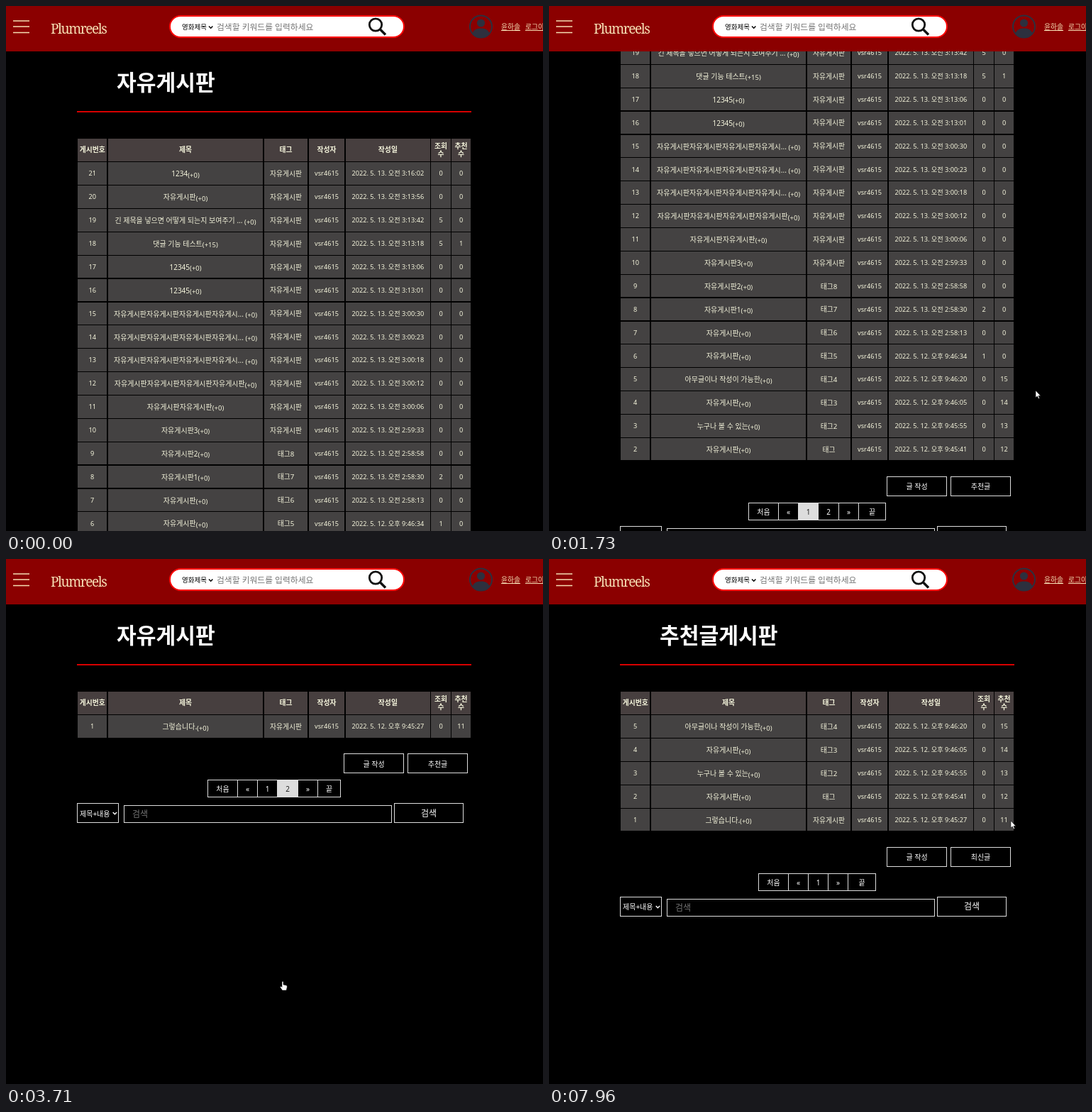
Recreate the animation shown at these times as an HTML page. Size 757 by 740 pixels, loop 8000 ms.

```html
<!DOCTYPE html>
<html lang="ko">
<head>
<meta charset="utf-8">
<title>자유게시판</title>
<style>
html, body { margin: 0; width: 100%; height: 100%; overflow: hidden; background: #000; }
body { position: relative; font: 10px/1.4 "Noto Sans", "Noto Sans CJK KR", "Noto Sans CJK JP", "Noto Sans CJK", sans-serif; color: #fff; }
body * { box-sizing: border-box; }
header, .page, .box, .row, h1, hr, header > *, #cursor, #cursor svg { position: absolute; }

header { left: 0; top: 0; width: 757px; height: 64px; background: #8b0000; color: wheat; overflow: hidden; }
header > span { line-height: 20px; white-space: nowrap; }
.art { left: 0; top: 0; }
.logo { left: 63px; top: 19px; font: 19px "Noto Serif", serif; letter-spacing: -1.4px; }
.kind { left: 248px; top: 19.5px; font-size: 9.5px; color: #000; }
.hint { left: 297px; top: 18.5px; font-size: 11.8px; color: #757575; }
.user { left: 698px; top: 19.5px; font-size: 9.8px; text-decoration: underline; }
.exit { left: 732px; top: 19.5px; font-size: 9.8px; text-decoration: underline; }

.page { left: 0; top: 0; width: 757px; height: 1094px; opacity: 0; }
h1 { margin: 0; left: 156px; top: 87.5px; font-size: 30.2px; line-height: 40px; white-space: nowrap; }
hr { margin: 0; left: 100px; top: 148px; width: 556px; height: 2px; border: 0; background: #d80000; }
.row { left: 101px; height: 31.55px; display: grid; gap: 1.3px; grid-template-columns: 41.4px 218.7px 61.7px 50.7px 119.5px 27.4px 26.8px; color: #f5f5dc; }
.row > div { background: #444242; display: flex; align-items: center; justify-content: center; padding-top: 1.5px; font-size: 9.2px; white-space: pre; text-align: center; }
.row > div:nth-child(2) { font-size: 10px; }
.row > div:nth-child(3) { font-size: 9.8px; }
.row.head { top: 186.6px; height: 32.5px; }
.row.head > div { background: #473f3f; font-size: 9.8px; font-weight: bold; line-height: 10.5px; }
.row i { font-style: normal; font-size: 9.5px; position: relative; top: 1.5px; }
.row b { font-weight: normal; position: relative; top: -.5px; }
.box { border: 1px solid #ddd; display: flex; align-items: center; justify-content: center; padding-top: 1px; white-space: pre; }
.big { font-size: 12px; }
.field { font-size: 12px; color: #757575; justify-content: left; padding-left: 11px; }
.pick { justify-content: left; padding-left: 3px; }
.pick svg { margin-left: 3px; }
.on { background: #ddd; color: #222; }

.page, #cursor, #cursor svg, .hover { animation: 8s step-end infinite; }
#new { animation-name: new, scroll; }
#old { animation-name: old; }
#best { animation-name: best; }
#cursor { left: 0; top: 0; animation-name: move; }
#cursor svg { left: 0; top: 0; overflow: visible; opacity: 0; }
#cursor .arrow { animation-name: arrow; }
#cursor .beam { animation-name: beam; }
#cursor .hand { animation-name: hand; }
#new .next { animation-name: hoverNext; }
#old .find { animation-name: hoverFind; }
#old .swap { animation-name: hoverSwap; }

@keyframes new { 0% { opacity: 1 } 43.125%, to { opacity: 0 } }
@keyframes old { 0% { opacity: 0 } 43.125% { opacity: 1 } 69.75%, to { opacity: 0 } }
@keyframes best { 0% { opacity: 0 } 69.75%, to { opacity: 1 } }
@keyframes scroll {
  0% { transform: translateY(0) }
  10% { transform: translateY(-102px) }
  11.625% { transform: translateY(-118px) }
  18.25% { transform: translateY(-138px) }
  20% { transform: translateY(-220px) }
  21.625% { transform: translateY(-236px) }
  26.625% { transform: translateY(-256px) }
  28.5% { transform: translateY(-338px) }
  30.125%, to { transform: translateY(-354px) }
}
@keyframes move {
  0% { transform: translate(-50px, -50px) }
  3.25% { transform: translate(729px, 689px) }
  4.875% { transform: translate(686px, 542px) }
  31.75% { transform: translate(590px, 575px) }
  33.375% { transform: translate(470px, 596px) }
  35% { transform: translate(428px, 599px) }
  36.625% { transform: translate(421px, 597px) }
  41.5% { transform: translate(408px, 597px) }
  43.125% { transform: translate(390px, 595px) }
  53% { transform: translate(440px, 545px) }
  54.625% { transform: translate(540px, 440px) }
  56.25% { transform: translate(612px, 358px) }
  58.125% { transform: translate(622px, 330px) }
  59.75% { transform: translate(616px, 300px) }
  61.375% { transform: translate(613px, 295px) }
  66.375% { transform: translate(610px, 296px) }
  74.625% { transform: translate(622px, 292px) }
  76.25% { transform: translate(633px, 288px) }
  78.125% { transform: translate(645px, 272px) }
  79.75% { transform: translate(652px, 250px) }
  81.375% { transform: translate(653px, 228px) }
  83% { transform: translate(651px, 245px) }
  84.625% { transform: translate(650px, 272px) }
  86.25% { transform: translate(649px, 305px) }
  87.875% { transform: translate(648px, 336px) }
  89.5% { transform: translate(655px, 352px) }
  91.125% { transform: translate(672px, 368px) }
  92.75% { transform: translate(685px, 376px) }
  96.25% { transform: translate(672px, 374px) }
  97.875% { transform: translate(658px, 371px) }
  99.5%, to { transform: translate(651px, 369px) }
}
@keyframes arrow { 0% { opacity: 1 } 35% { opacity: 0 } 53% { opacity: 1 } 56.25% { opacity: 0 } 58.125% { opacity: 1 } 59.75% { opacity: 0 } 66.375%, to { opacity: 1 } }
@keyframes beam { 0% { opacity: 0 } 35% { opacity: 1 } 39.875%, to { opacity: 0 } }
@keyframes hand { 0% { opacity: 0 } 39.875% { opacity: 1 } 53% { opacity: 0 } 56.25% { opacity: 1 } 58.125% { opacity: 0 } 59.75% { opacity: 1 } 66.375%, to { opacity: 0 } }
@keyframes hoverNext { 0% { background: #000 } 35%, to { background: #1a1d1d } }
@keyframes hoverFind { 0% { background: #000 } 56.25% { background: #1a1d1d } 58.125%, to { background: #000 } }
@keyframes hoverSwap { 0% { background: #000 } 59.75%, to { background: #1a1d1d } }
</style>
</head>
<body>
<main></main>
<header>
  <svg class="art" width="757" height="64" fill="none">
    <path d="M10 21H33M10 29H33M10 37.500H33" stroke="wheat" stroke-width="1.7"/>
    <rect x="231" y="14" width="330" height="30" rx="15" fill="#fff" stroke="#f00" stroke-width="2"/>
    <path d="M286 28.5L288.7 31.2 291.4 28.5" stroke="#000" stroke-width="1.5"/>
    <circle cx="521" cy="26.5" r="8.7" stroke="#111" stroke-width="2.8"/>
    <path d="M527 32.5L535 40.5" stroke="#111" stroke-width="3.4"/>
    <circle cx="669.5" cy="29" r="15.5" stroke="#2d303e" stroke-width="2"/>
    <circle cx="669.5" cy="24" r="5.6" fill="#2d303e"/>
    <path d="M657.5 40C658 34 663 31.5 669.5 31.5S681 34 681.5 40Q676 45 669.5 45T657.5 40Z" fill="#2d303e"/>
  </svg>
  <span class="logo">Plumreels</span>
  <span class="kind">영화제목</span>
  <span class="hint">검색할 키워드를 입력하세요</span>
  <span class="user">윤하솔</span>
  <span class="exit">로그아웃</span>
</header>
<div id="cursor">
  <svg class="arrow" width="9" height="13"><path d="M0 0V10L2.3 7.9 4 11.5 5.5 10.9 3.9 7.4H7Z" fill="#fff" stroke="#000" stroke-width=".5"/></svg>
  <svg class="beam" width="6" height="12"><path d="M-2.5-4.5H-.5L0-4 .5-4.5H2.5M0-4V5M-2.5 5.5H-.5L0 5 .5 5.5H2.5" fill="none" stroke="#ccc"/></svg>
  <svg class="hand" width="10" height="14"><path d="M-1 1Q0-.7 1 1V5L5.5 6Q6.5 6.5 6.3 8.5L5.2 13H-.5L-3.5 8.5Q-3.5 7-2 7.5L-1 8.5Z" fill="#fff" stroke="#000" stroke-width=".5"/></svg>
</div>
<script>
const BOARD = '자유게시판';
const LONG = BOARD.repeat(3) + '자유게시... ';
const AM = '13. 오전 ', PM = '12. 오후 ';
const PITCH = 32.87, FIRST_ROW = 220.4, ROW_HEIGHT = 31.55;

// number, title, tag, time, views, likes, comments
const posts = [
  [21, '1234', BOARD, AM + '3:16:02', 0, 0],
  [20, BOARD, BOARD, AM + '3:13:56', 0, 0],
  [19, '긴 제목을 넣으면 어떻게 되는지 보여주기 ... ', BOARD, AM + '3:13:42', 5, 0],
  [18, '댓글 기능 테스트', BOARD, AM + '3:13:18', 5, 1, 15],
  [17, '12345', BOARD, AM + '3:13:06', 0, 0],
  [16, '12345', BOARD, AM + '3:13:01', 0, 0],
  [15, LONG, BOARD, AM + '3:00:30', 0, 0],
  [14, LONG, BOARD, AM + '3:00:23', 0, 0],
  [13, LONG, BOARD, AM + '3:00:18', 0, 0],
  [12, BOARD.repeat(4), BOARD, AM + '3:00:12', 0, 0],
  [11, BOARD.repeat(2), BOARD, AM + '3:00:06', 0, 0],
  [10, BOARD + '3', BOARD, AM + '2:59:33', 0, 0],
  [9, BOARD + '2', '태그8', AM + '2:58:58', 0, 0],
  [8, BOARD + '1', '태그7', AM + '2:58:30', 2, 0],
  [7, BOARD, '태그6', AM + '2:58:13', 0, 0],
  [6, BOARD, '태그5', PM + '9:46:34', 1, 0],
  [5, '아무글이나 작성이 가능한', '태그4', PM + '9:46:20', 0, 15],
  [4, BOARD, '태그3', PM + '9:46:05', 0, 14],
  [3, '누구나 볼 수 있는', '태그2', PM + '9:45:55', 0, 13],
  [2, BOARD, '태그', PM + '9:45:41', 0, 12],
  [1, '그렇습니다.', BOARD, PM + '9:45:27', 0, 11]
];

const cells = list => list.map(text => `<div>${text}</div>`).join('');
const box = (x, y, w, h, text, kind = '') =>
  `<div class="box ${kind}" style="left:${x}px;top:${y}px;width:${w}px;height:${h}px">${text}</div>`;
const chevron = '<svg width="7" height="5" fill="none" stroke="#fff" stroke-width="1.4"><path d="M.7 1L3.4 3.7 6.1 1"/></svg>';

function row([id, title, tag, time, views, likes, comments = 0], i) {
  const list = [id, `<b>${title}</b><i>(+${comments})</i>`, tag, 'vsr4615', '2022. 5. ' + time, views, likes];
  return `<div class="row" style="top:${FIRST_ROW + i * PITCH}px">${cells(list)}</div>`;
}

function page({ id, title, rows, pages, edges, current, swap }) {
  const end = FIRST_ROW + (rows.length - 1) * PITCH + ROW_HEIGHT;
  const labels = ['처음', '«', ...pages, '»', '끝'];
  const pager = labels.map((label, i) => {
    const kind = label === current ? 'on' : label === '»' ? 'next hover' : '';
    return box(edges[i], end + 59.5, edges[i + 1] - edges[i] + 1, 25, label, kind);
  }).join('');
  const head = ['게시번호', '제목', '태그', '작성자', '작성일', '조회\n수', '추천\n수'];
  return `<section class="page" id="${id}"><h1>${title}</h1><hr>
    <div class="row head">${cells(head)}</div>${rows.map(row).join('')}
    ${box(476, end + 22.5, 85, 28, '글 작성')}${box(566, end + 22.5, 85, 28, swap, 'swap hover')}${pager}
    ${box(100, end + 92.5, 59, 28, '제목+내용' + chevron, 'pick')}
    ${box(166, end + 95.5, 378, 25, '검색', 'field')}
    ${box(547, end + 92.5, 98, 28, '검색', 'big find hover')}</section>`;
}

document.querySelector('main').innerHTML = [
  { id: 'new', title: BOARD, rows: posts.slice(0, 20), pages: ['1', '2'], current: '1', swap: '추천글',
    edges: [281, 323, 351, 379, 408, 436, 474] },
  { id: 'old', title: BOARD, rows: posts.slice(20), pages: ['1', '2'], current: '2', swap: '추천글',
    edges: [284, 326, 354, 382, 411, 439, 471] },
  { id: 'best', title: '추천글게시판', rows: posts.slice(16), pages: ['1'], swap: '최신글',
    edges: [295, 337, 365, 393, 421, 460] }
].map(page).join('');
</script>
</body>
</html>
```
